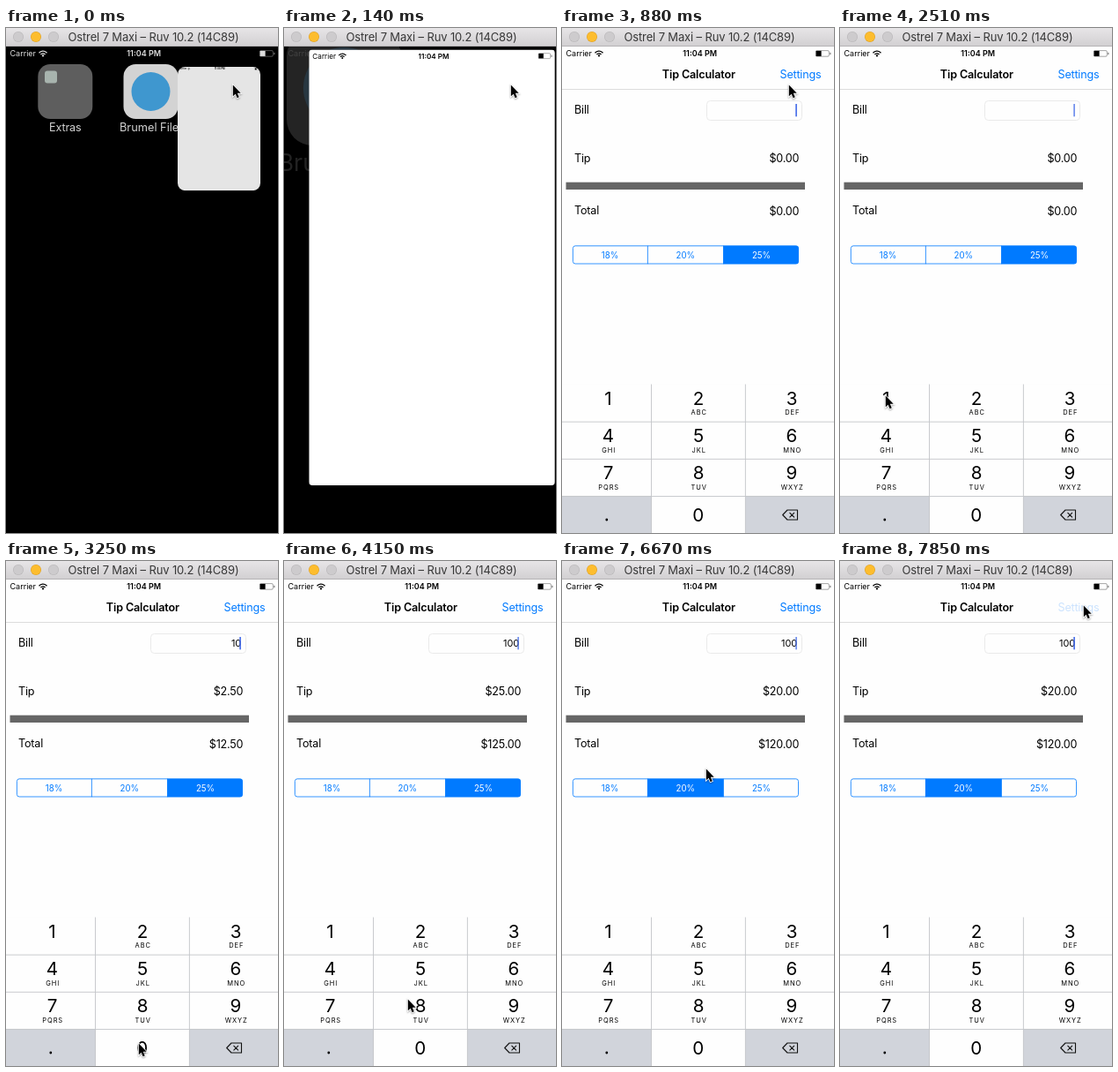
An HTML page with a canvas that plays this animation: 309 by 572 pixels, repeating every 8000 ms.

```html
<!DOCTYPE html>
<html lang="en">
<head>
<meta charset="utf-8">
<title>Tip Calculator</title>
<style>
html, body { margin: 0; width: 100%; height: 100%; overflow: hidden; background: #000; }
canvas { display: block; width: 309px; height: 572px; }
</style>
</head>
<body>
<canvas id="stage"></canvas>
<script>
const W = 309, H = 572, LOOP = 8000, STEP = 148.2, LAST = 53;
const BLUE = '#007aff', FONT = 'Inter, "Open Sans", sans-serif';
const canvas = document.getElementById('stage');
const ctx = canvas.getContext('2d');
const dpr = window.devicePixelRatio || 1;
canvas.width = W * dpr;
canvas.height = H * dpr;

// Pointer path: [step, x, y]
const PATH = [
  [0, 257, 64], [6, 257, 64], [7, 256, 73], [8, 252, 90], [9, 243, 104], [11, 229, 119],
  [12, 229, 119], [13, 215, 150], [15, 85, 370], [16, 56, 410], [17, 51, 416], [18, 51, 416],
  [19, 75, 456], [20, 150, 546], [27, 150, 546], [28, 140, 496], [29, 140, 428], [31, 146, 300],
  [32, 149, 262], [33, 150, 252], [44, 150, 252], [45, 163, 235], [47, 245, 105],
  [48, 270, 62], [49, 276, 50], [53, 276, 50]
];

function pointerAt(k) {
  const i = Math.max(1, PATH.findIndex(p => p[0] >= k));
  const [k0, x0, y0] = PATH[i - 1], [k1, x1, y1] = PATH[i];
  const u = (k - k0) / (k1 - k0);
  return [x0 + (x1 - x0) * u, y0 + (y1 - y0) * u];
}

// One blink lasts seven steps: fading, off, off, fading, on, on, on
function caretAlpha(k) {
  if (k < 7 || (k > 17 && k < 28)) return 1;
  return [0.8, 0, 0, 0.8, 1, 1, 1][k % 7];
}

const billAt = k => k < 19 ? '' : k < 22 ? '1' : k < 24 ? '10' : '100';
const pressedKey = k => k === 18 ? 0 : k === 21 || k === 23 ? 10 : -1;

function text(str, x, y, size, color, align = 'left', weight = 400, gap = 0) {
  ctx.font = `${weight} ${size}px ${FONT}`;
  ctx.letterSpacing = gap + 'px';
  ctx.textAlign = align;
  ctx.fillStyle = color;
  ctx.fillText(str, x, y);
}

function box(x, y, w, h, color) {
  ctx.fillStyle = color;
  ctx.fillRect(x, y, w, h);
}

function rounded(x, y, w, h, r) {
  ctx.beginPath();
  ctx.roundRect(x, y, w, h, r);
}

function disc(x, y, r, color) {
  ctx.fillStyle = color;
  ctx.beginPath();
  ctx.arc(x, y, r, 0, Math.PI * 2);
  ctx.fill();
}

function titleBar() {
  const g = ctx.createLinearGradient(0, 0, 0, 21);
  g.addColorStop(0, '#e7e5e7');
  g.addColorStop(1, '#d1cfd1');
  box(0, 0, W, 21, g);
  box(0, 20, W, 1, '#b5b3b5');
  [[14, '#cdcbcd', '#b9b7b9'], [34, '#fdbd2e', '#e0a32a'], [54, '#cdcbcd', '#b9b7b9']].forEach(([x, fill, rim]) => {
    disc(x, 10, 6, rim);
    disc(x, 10, 5.4, fill);
  });
  text('Ostrel 7 Maxi – Ruv 10.2 (14C89)', 167.5, 15, 13, '#383838', 'center', 400, -0.14);
}

// Status bar with its top left corner at the current origin
function statusBar(color) {
  text('Carrier', 4.5, 11.3, 9, color);
  text('11:04 PM', 156.7, 11.3, 9, color, 'center', 600);
  ctx.strokeStyle = color;
  ctx.lineWidth = 1.3;
  for (const r of [3.4, 6]) {
    ctx.beginPath();
    ctx.arc(42, 11.2, r, -Math.PI * 0.77, -Math.PI * 0.23);
    ctx.stroke();
  }
  disc(42, 10.4, 1.1, color);
  ctx.globalAlpha *= 0.5;
  ctx.lineWidth = 0.7;
  rounded(288.3, 4.6, 15, 6.6, 1.3);
  ctx.stroke();
  box(304.2, 6.8, 1.2, 2.4, color);
  ctx.globalAlpha *= 2;
  box(288.6, 4.9, 6, 6, color);
}

function homeIcons() {
  ctx.fillStyle = '#5e5e5e';
  rounded(36.3, 41, 62, 62, 14);
  ctx.fill();
  ctx.fillStyle = '#a8b4ae';
  rounded(44, 48.5, 14, 14, 3);
  ctx.fill();
  text('Extras', 67.3, 117, 12.6, '#d2d2d2', 'center', 400, -0.1);
  ctx.fillStyle = '#d3d3d3';
  rounded(133.5, 41, 62, 62, 14);
  ctx.fill();
  disc(164.5, 72, 22, '#3f97cf');
  text('Brumel Files', 166, 117, 12.8, '#d2d2d2', 'center');
}

function card(x, y, w, h, r, color) {
  ctx.save();
  rounded(x, y, w, h, r);
  ctx.clip();
  box(x, y, w, h, color);
  ctx.translate(x, y);
  ctx.scale(w / W, w / W);
  statusBar('#000');
  ctx.restore();
}

function home(k) {
  box(0, 21, W, H - 21, '#000');
  ctx.save();
  ctx.globalAlpha = k === 0 ? 0.87 : k === 1 ? 0.15 : 0;
  ctx.save();
  ctx.translate(0, 21);
  statusBar('#fff');
  ctx.restore();
  ctx.globalAlpha = k === 0 ? 1 : k === 1 ? 0.17 : 0;
  if (k > 0) {
    ctx.translate(3, 133);
    ctx.scale(2.1, 2.1);
    ctx.translate(-133.5, -103);
  }
  homeIcons();
  ctx.restore();
  if (k === 0) card(195, 44, 94, 140.3, 8.5, '#e5e5e5');
  else if (k === 1) card(28.3, 24.5, 279.5, 493.5, 4, '#fff');
  else card(4, 21.5, 304.5, 542, 3, '#fff');
}

function segments(k) {
  const edges = [12, 97, 183.2, 268.9], active = k < 43 ? 2 : 1;
  const top = 246.4, tall = 21;
  ctx.save();
  rounded(12, top, 256.9, tall, 3);
  ctx.clip();
  box(edges[active], top, edges[active + 1] - edges[active], tall, BLUE);
  if (k === 42) box(97, top, 86.2, tall, 'rgba(0,122,255,0.15)');
  box(96.9, top, 0.8, tall, BLUE);
  box(183, top, 0.8, tall, BLUE);
  ctx.restore();
  ctx.strokeStyle = BLUE;
  ctx.lineWidth = 0.8;
  rounded(12.4, top + 0.4, 256.1, tall - 0.8, 2.7);
  ctx.stroke();
  ['18%', '20%', '25%'].forEach((s, i) =>
    text(s, [54.5, 140.3, 226.5][i], 260.6, 9.7, i === active ? '#fff' : BLUE, 'center'));
}

function backspace() {
  ctx.strokeStyle = '#111';
  ctx.lineWidth = 1.1;
  ctx.lineJoin = 'round';
  ctx.beginPath();
  ctx.moveTo(250.7, 551.5);
  ctx.lineTo(256, 546);
  ctx.lineTo(267.5, 546);
  ctx.lineTo(267.5, 557);
  ctx.lineTo(256, 557);
  ctx.closePath();
  ctx.moveTo(258.5, 548.8);
  ctx.lineTo(264, 554.3);
  ctx.moveTo(264, 548.8);
  ctx.lineTo(258.5, 554.3);
  ctx.stroke();
}

function keyboard(k, drop) {
  const top = 403.5, tall = 42.15;
  const cols = [0, 101.5, 208.3, W], mid = [52.5, 155, 261], gray = '#d1d4db';
  const letters = ['', 'ABC', 'DEF', 'GHI', 'JKL', 'MNO', 'PQRS', 'TUV', 'WXYZ'];
  ctx.save();
  ctx.translate(0, drop);
  box(0, top, W, H - top, '#fefefe');
  for (let i = 0; i < 12; i++) {
    const c = i % 3, y = top + tall * Math.floor(i / 3);
    if ((i === 9 || i === 11) !== (i === pressedKey(k)))
      box(cols[c], y, cols[c + 1] - cols[c], tall, gray);
    if (i > 8) continue;
    text(String(i + 1), mid[c], y + 23.3, 20.6, '#000', 'center');
    text(letters[i], mid[c] + 0.7, y + 34.9, 7.5, '#000', 'center', 400, 0.9);
  }
  for (const x of cols.slice(1, 3)) box(x - 0.4, top, 0.9, H - top, '#c3c5c9');
  for (let r = 1; r < 4; r++) box(0, top + tall * r, W, 0.9, '#c3c5c9');
  text('0', 154.8, 559, 20.6, '#000', 'center');
  disc(50.8, 557, 1.4, '#000');
  backspace();
  ctx.restore();
}

function app(k) {
  box(0, 21, W, H - 21, '#fefefe');
  ctx.save();
  ctx.translate(0, 21);
  statusBar('#000');
  ctx.restore();
  if (k < 4) return;

  const bill = billAt(k), rate = k < 43 ? 0.25 : 0.2;
  const money = n => '$' + n.toFixed(2);
  const label = (s, x, y, align) => text(s, x, y, 12.6, '#000', align, 400, -0.2);

  text('Tip Calculator', 155.3, 57, 12.6, '#000', 'center', 600, -0.15);
  ctx.globalAlpha = k > 51 ? 0.2 : 1;
  text('Settings', 247.5, 57, 12.6, BLUE, 'left', 400, -0.2);
  ctx.globalAlpha = 1;
  box(0, 69, W, 1, '#dcdcdc');

  label('Bill', 14, 97.3);
  ctx.strokeStyle = '#e8e8e8';
  ctx.lineWidth = 0.9;
  rounded(164.5, 82.5, 108, 22, 4);
  ctx.stroke();
  text(bill, 267.2, 97, 10.9, '#000', 'right');
  ctx.globalAlpha = caretAlpha(k);
  box(265.3, 86, 1.6, 14.3, '#4169e8');
  ctx.globalAlpha = 1;

  label('Tip', 14, 152);
  label(money(bill * rate), 269.3, 152, 'right');
  box(4.5, 174.7, 271.5, 8.3, '#666');
  label('Total', 14, 211.3);
  label(money(bill * (1 + rate)), 269.3, 212, 'right');
  segments(k);
  keyboard(k, k === 4 ? 80 : 0);
}

function pointer(x, y) {
  const shape = [[0, 0], [0, 15.2], [3.4, 12], [5.7, 17.4], [8.3, 16.3], [6, 11], [10.6, 11]];
  ctx.save();
  ctx.translate(x + 0.8, y + 0.6);
  ctx.scale(0.84, 0.84);
  ctx.beginPath();
  shape.forEach(([px, py]) => ctx.lineTo(px, py));
  ctx.closePath();
  ctx.shadowColor = 'rgba(0,0,0,0.35)';
  ctx.shadowBlur = 2 * dpr;
  ctx.shadowOffsetY = dpr;
  ctx.lineJoin = 'miter';
  ctx.lineWidth = 2;
  ctx.strokeStyle = '#fff';
  ctx.stroke();
  ctx.shadowColor = 'transparent';
  ctx.fillStyle = '#000';
  ctx.fill();
  ctx.restore();
}

function draw(ms) {
  const k = Math.min(LAST, Math.floor((ms % LOOP + 10) / STEP));
  ctx.setTransform(dpr, 0, 0, dpr, 0, 0);
  ctx.globalAlpha = 1;
  if (k < 3) home(k);
  else app(k);
  titleBar();
  pointer(...pointerAt(k));
}

const start = performance.now();
function tick() {
  draw(performance.now() - start);
  requestAnimationFrame(tick);
}
tick();
</script>
</body>
</html>
```
